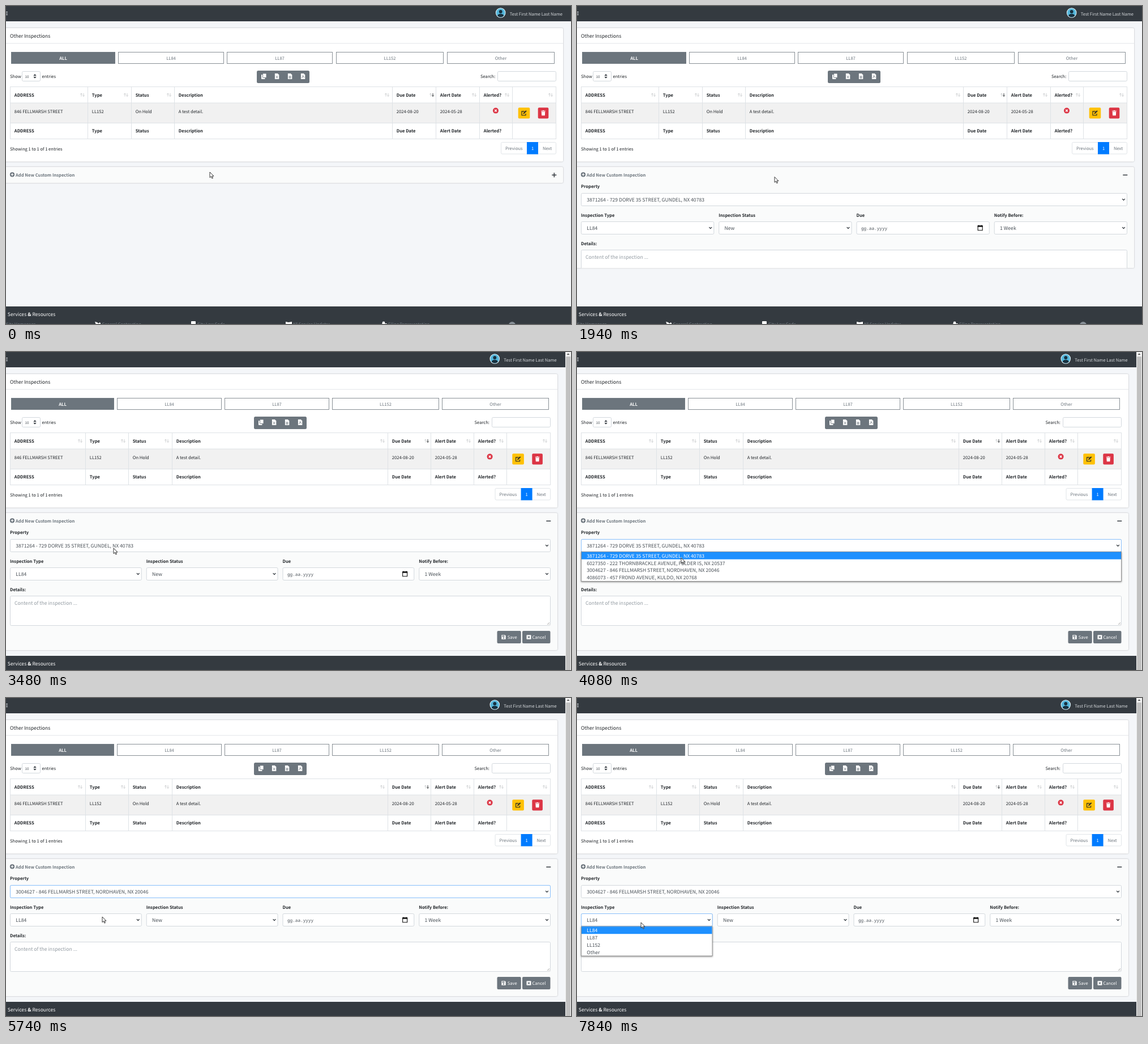
An HTML page for the animation above (8000 ms loop, 998x561 px).

```html
<!DOCTYPE html>
<html lang="en">
<head>
<meta charset="utf-8">
<title>Other Inspections</title>
<style>
html, body { margin: 0; width: 100%; height: 100%; overflow: hidden; background: #f4f6f9; }
svg { display: block; width: 100%; height: 100%; }
text { font-family: "Noto Sans CJK JP", "Noto Sans CJK SC", "Noto Sans", sans-serif; text-rendering: geometricPrecision; white-space: pre; }
.mono { font-family: "Noto Sans Mono", "DejaVu Sans Mono", monospace; }
.card { filter: drop-shadow(0 .6px 1px rgba(0,0,0,.28)); }
.popup { filter: drop-shadow(0 1px 1.5px rgba(0,0,0,.45)); }
</style>
</head>
<body>
<svg id="stage" viewBox="0 0 998 561" preserveAspectRatio="none"></svg>
<script>
const SMALL = 7.6, LARGE = 8.65;
const DARK = '#343a40', GRAY = '#6c757d', INK = '#212529', FIELD = '#495057', LINE = '#dee2e6';
const PROPERTIES = [
  '3871264 - 729 DORVE 35 STREET, GUNDEL, NX 40783',
  '6027350 - 222 THORNBRACKLE AVENUE, FELDER IS, NX 20537',
  '3004627 - 846 FELLMARSH STREET, NORDHAVEN, NX 20046',
  '4086073 - 457 FROND AVENUE, KULDO, NX 20768'
];
const TYPES = ['LL84', 'LL87', 'LL152', 'Other'];
const OPTION_H = 12.9;

const WIDE = {
  page: 998, shift: 0, right: 971, footer: 530,
  tabs: [[9, 193], [198, 385], [390, 577], [583, 773], [779, 969]],
  cols: [7, 144, 221, 297, 682, 759, 836, 894, 971], tools: 443
};
const NARROW = {
  page: 988, shift: -10.4, right: 961, footer: 536,
  tabs: [[9, 191], [196, 381], [386, 571], [576, 765], [770, 959]],
  cols: [7, 140, 216, 293, 674, 750, 826, 884, 961], tools: 438
};

const text = (x, y, s, o = {}) =>
  `<text x="${x}" y="${y}" font-size="${o.size || SMALL}" fill="${o.fill || INK}"` +
  ` font-weight="${o.bold ? 700 : 400}" text-anchor="${o.mid ? 'middle' : 'start'}" class="${o.cls || ''}">${s}</text>`;
const fill = (x, y, x2, y2, color, r = 0, cls = '') =>
  `<rect x="${x}" y="${y}" width="${x2 - x}" height="${y2 - y}" rx="${r}" fill="${color}" class="${cls}"/>`;
const box = (x, y, x2, y2, stroke = '#ced4da', bg = '#fff', r = 2, cls = '') =>
  `<rect x="${x + .5}" y="${y + .5}" width="${x2 - x}" height="${y2 - y}" rx="${r}" fill="${bg}" stroke="${stroke}" stroke-width=".9" class="${cls}"/>`;
const line = (d, color, w = 1) => `<path d="${d}" fill="none" stroke="${color}" stroke-width="${w}"/>`;
const shape = (d, color) => `<path d="${d}" fill="${color}"/>`;
const dot = (x, y, r, color) => `<circle cx="${x}" cy="${y}" r="${r}" fill="${color}"/>`;
const at = (x, y, s) => `<g transform="translate(${x} ${y})">${s}</g>`;

function header(L) {
  const x = 873.7 + L.shift;
  return fill(0, 0, L.page, 27, DARK) +
    line('M0 10.5H3M0 13H3M0 15.5H3', '#d0d4d8', 1.1) +
    at(x, 12, dot(0, 0, 8.8, '#e8f6fb') + dot(0, 0, 7.8, '#55b7dc') +
      shape('M-5.5 5.5Q-5 1.8 0 1.8T5.5 5.5Q3 7.8 0 7.8T-5.5 5.5Z', '#17303f') + dot(0, -2, 3, '#17303f')) +
    text(889.7 + L.shift, 16.6, 'Test First Name Last Name', { fill: '#d5d8db' });
}

function tools(x) {
  const sheet = mark => shape('M-3.6 -5H1.3L3.8 -2.5V5H-3.6Z', '#fff') + line(mark, GRAY, .9);
  return fill(x, 114, x + 93, 136, GRAY, 2.5) +
    at(x + 12.5, 124, fill(-4.5, -3, 2, 5, '#fff', .8) + box(-2.5, -5.5, 4, 2, GRAY, '#fff', .8)) +
    at(x + 35.5, 124, sheet('M-1.6 -.8L1.7 3.4M1.7 -.8L-1.6 3.4')) +
    at(x + 58.5, 124, sheet('M-2 0H2M-2 1.6H2M-2 3.2H2')) +
    at(x + 81.5, 124, sheet('M-2 3.2Q0 1 0 -1.5Q.5 1.5 2.4 2'));
}

function table(L) {
  const c = L.cols, names = ['ADDRESS', 'Type', 'Status', 'Description', 'Due Date', 'Alert Date', 'Alerted?', ''];
  const cells = ['846 FELLMARSH STREET', 'LL152', 'On Hold', 'A test detail.', '2024-08-20', '2024-05-28'];
  let s = fill(7, 142, L.right, 234, '#fff') + fill(7, 171, L.right, 206, '#f1f1f1');
  s += line(`M7 142.5H${L.right}M7 171H${L.right}M7 206.5H${L.right}M7 234.5H${L.right}`, LINE);
  s += line(c.map(x => `M${x + .5} 142V235`).join(''), LINE);
  names.forEach((n, i) => {
    const x = c[i] + 7.8, a = c[i + 1] - (i == 4 ? 7 : 9);
    s += text(x, 159.7, n, { bold: 1 }) + text(x, 222.7, n, { bold: 1 });
    if (cells[i]) s += text(x, 188.7, cells[i]);
    s += line(`M${a - 2} 159.5V154.3M${a - 3.7} 156L${a - 2} 154L${a - .3} 156`, '#c8cacc', .9) +
      line(`M${a + 2} 154V159.2M${a + .3} 157.5L${a + 2} 159.5L${a + 3.7} 157.5`, i == 4 ? INK : '#c8cacc', .9);
  });
  const d = L.shift;
  return s + at(865 + d, 184.6, dot(0, 0, 5, '#dc3545') + line('M-1.8 -1.8L1.8 1.8M1.8 -1.8L-1.8 1.8', '#fff', 1.4)) +
    at(915 + d, 188.7, fill(-10.3, -9.5, 10.3, 9.7, '#ffc107', 2) +
      line('M1 -2.8H-4V4H3V1', INK, 1.1) + line('M-1 1.2L4 -3.8', INK, 2)) +
    at(949 + d, 188.7, fill(-9.3, -9.5, 9.3, 9.7, '#dc3545', 2) +
      shape('M-3.8 -4H-1.3L-.8 -4.7H.8L1.3 -4H3.8V-2.9H-3.8ZM-3.3 -2.2H3.3L2.8 4.6H-2.8Z', '#fff'));
}

function listCard(L) {
  const d = L.shift, R = L.right;
  let s = fill(-8, 39, R + 13, 274.5, '#fff', 2, 'card') + line(`M0 66H${R + 13}`, '#e3e5e8') +
    text(7, 56, 'Other Inspections', { size: LARGE });
  ['ALL', ...TYPES].forEach((n, i) => {
    const [a, b] = L.tabs[i];
    s += box(a, 81, b - 1, 101, i ? '#7d858c' : GRAY, i ? '#fff' : GRAY, 0) +
      text((a + b) / 2, 94.5, n, { mid: 1, bold: !i, fill: i ? GRAY : '#fff' });
  });
  s += text(7, 126.6, 'Show') + box(28, 115, 60, 132) + text(33.5, 126.5, '10', { size: 6.2, fill: FIELD }) +
    shape('M48.3 123L51 120L53.7 123ZM48.3 124.8L51 127.8L53.7 124.8Z', DARK) + text(63.5, 126.6, 'entries') +
    tools(L.tools) + text(838 + d, 127, 'Search:') + box(868 + Math.round(d), 115, R, 132) + table(L) +
    text(7, 255.2, 'Showing 1 to 1 of 1 entries');
  s += box(874 + d, 240, R, 260.5, LINE) + fill(920 + d, 240, 940 + d, 261.5, '#007bff') +
    text(897.3 + d, 253.5, 'Previous', { mid: 1, fill: GRAY }) + text(930 + d, 253.5, '1', { mid: 1, fill: '#fff' }) +
    text(956 + d, 253.5, 'Next', { mid: 1, fill: GRAY });
  return s;
}

const chevron = (x, y) => line(`M${x - 2.4} ${y - 1.2}L${x} ${y + 1.2}L${x + 2.4} ${y - 1.2}`, DARK, 1.3);
function select(x, y, x2, value, cls = '') {
  return box(x, y, x2, y + 22) + (cls && box(x, y, x2, y + 22, '#80bdff', 'none', 2, cls + '-focus')) +
    text(x + 10.3, y + 15, value, { size: LARGE, fill: FIELD, cls }) + chevron(x2 - 5.5, y + 11.3);
}

function form(L) {
  const R = L.right, w = (R - 34) / 4, x = [0, 1, 2, 3].map(i => 7 + i * (w + 9)), y = 380;
  const label = (x, y, s) => text(x, y, s, { bold: 1 });
  let s = label(7, 321, 'Property') + select(7, 330, R, PROPERTIES[0], 'property');
  ['Inspection Type', 'Inspection Status', 'Due', 'Notify Before:'].forEach((n, i) => s += label(x[i], 371.6, n));
  s += select(x[0], y, x[0] + w, 'LL84', 'type') + select(x[1], y, x[1] + w, 'New') + select(x[3], y, x[3] + w, '1 Week') +
    box(x[2], y, x[2] + w, y + 22) + text(x[2] + 8.5, 395.3, 'gg.aa.yyyy', { size: 7.7, fill: FIELD, cls: 'mono' }) +
    at(x[2] + w - 15.6, 391.5, line('M-4 -3.5H4V4.2H-4Z', '#111', 1.1) + fill(-4.5, -4.4, 4.5, -1.8, '#111') +
      line('M-2.5 -5.2V-4M2.5 -5.2V-4', '#111', 1));
  s += label(7, 422.2, 'Details:') + box(7, 430, R, 482) +
    text(15, 445.8, 'Content of the inspection ...', { size: LARGE, fill: '#939ba2' }) +
    line(`M${R - 5} 481L${R - 1} 477M${R - 2.5} 481L${R - 1} 479.5`, '#888', .7);
  const d = R - 961;
  return s + fill(867.5 + d, 492, 909.7 + d, 514, GRAY, 2) + fill(912 + d, 492, 961.5 + d, 514, GRAY, 2) +
    at(879 + d, 503, shape('M-3.7 -3.7H2.4L3.7 -2.4V3.7H-3.7Z', '#fff') + fill(-2.5, -2.7, 1.5, -.8, GRAY) + dot(0, 1.4, 1.2, GRAY)) +
    text(885.8 + d, 506.4, 'Save', { fill: '#fff' }) +
    at(923.5 + d, 503, fill(-4, -3.7, 4, 3.7, '#fff', .7) + line('M-1.7 -1.7L1.7 1.7M1.7 -1.7L-1.7 1.7', GRAY, 1.2)) +
    text(929.5 + d, 506.4, 'Cancel', { fill: '#fff' });
}

function formCard(L) {
  const m = L.right - 2.7;
  return fill(-8, 284, L.right + 13, 526, '#fafbfb', 2, 'card form-card') +
    at(11, 297.4, dot(0, 0, 4.1, GRAY) + line('M-2.3 0H2.3M0 -2.3V2.3', '#fff', 1.3)) +
    text(17, 300.8, 'Add New Custom Inspection', { bold: 1, fill: GRAY }) +
    line(`M${m - 4} 298.2H${m + 4}`, DARK, 1.5) +
    `<g class="plus">${line(`M${m} 294.2V302.2`, DARK, 1.5)}</g>` +
    `<g class="form">${form(L)}</g>`;
}

function footer(L) {
  const y = L.footer, links = ['Site Homepage', 'General Contracting', 'City Law Code', 'All Service Updates', 'Filing Representation'];
  return fill(0, y, L.page, 561, DARK) +
    text(2.8, y + 17.2, 'Services <tspan font-weight="700">&amp;</tspan> Resources', { size: LARGE, fill: '#fff' }) +
    links.map((n, i) => text(i ? 1 + i * 168.5 : 0, y + 34, n, { size: 7.4, fill: '#7d858c' })).join('') +
    shape(`M157 ${y + 27}l4 1 2 2 3 -2 2 4h-9ZM494 ${y + 27}l5 1 6 -1v6h-11Z`, '#fff') +
    fill(327, y + 26, 335, y + 34, '#fff', 1) + dot(667, y + 29, 2.4, '#fff') + fill(664, y + 30, 673, y + 34, '#fff', 1) +
    dot(894, y + 33, 6, '#868e96');
}

const scrollbar = fill(988, 0, 998, 561, '#f1f1f1') + fill(989, 8, 997, 561, '#c1c1c1') + shape('M990.5 5L993 2.2L995.5 5Z', '#555');

function popup(id, x2, y, options) {
  return `<g id="${id}">` + box(7, y, x2, y + 52, '#8a8a8a', '#fff', 0, 'popup') +
    fill(8, y + .8, x2, y + .8 + OPTION_H, '#1e90ff', 0, 'mark') +
    options.map((o, i) => text(17.3, y + 10.6 + i * OPTION_H, o, { size: LARGE, fill: FIELD, cls: 'option' })).join('') + '</g>';
}

const page = (id, L) => `<g id="${id}">${header(L) + listCard(L) + formCard(L) + footer(L)}</g>`;
const stage = document.getElementById('stage');
stage.innerHTML = '<defs><clipPath id="reveal"><rect y="284" width="998" height="28"/></clipPath></defs>' +
  fill(0, 0, 998, 561, '#f4f6f9') + page('wide', WIDE) + page('narrow', NARROW) +
  `<g id="bar">${scrollbar}</g>` + popup('properties', 961, 352, PROPERTIES) + popup('types', 238.5, 402.5, TYPES) +
  '<path id="cursor" d="M0 0V9.7L2.3 7.6L3.9 11.2L5.5 10.5L3.9 7.1H7Z" fill="#fff" stroke="#222" stroke-width=".9" stroke-linejoin="round"/>';

const $ = q => stage.querySelector(q);
const show = (q, on) => $(q).setAttribute('display', on ? 'inline' : 'none');
const clamp = (v, a = 0, b = 1) => Math.min(b, Math.max(a, v));
$('#wide .form').setAttribute('clip-path', 'url(#reveal)');
show('#narrow .plus', false);

// time, x, y
const PATH = [
  [0, 360, 293], [20, 360, 293], [280, 354, 294], [560, 354, 294], [840, 342, 302], [1260, 342, 302],
  [1480, 349, 301.5], [2080, 349, 301.5], [2400, 220, 340], [2660, 200, 343], [2820, 200, 343],
  [3060, 190, 346], [3760, 190, 346], [4080, 184, 363], [4220, 181, 370], [4320, 181, 370],
  [4460, 177, 402], [4880, 177, 402], [5160, 171, 393], [5440, 170, 386], [6040, 170, 386],
  [6460, 137, 391], [6840, 124, 392], [6860, 124, 392], [7140, 113, 396], [8000, 113, 396]
];
function pointer(t) {
  const i = PATH.findIndex(p => p[0] > t), a = PATH[i - 1], b = PATH[i];
  const k = (t - a[0]) / (b[0] - a[0]);
  return [a[1] + (b[1] - a[1]) * k, a[2] + (b[2] - a[2]) * k];
}

function highlight(id, index, top) {
  $(`#${id} .mark`).setAttribute('y', top + index * OPTION_H);
  stage.querySelectorAll(`#${id} .option`).forEach((o, i) => o.setAttribute('fill', i == index ? '#fff' : FIELD));
}

function draw(t) {
  const narrow = t >= 2080, [x, y] = pointer(t);
  show('#wide', !narrow);
  show('#narrow', narrow);
  show('#bar', narrow);

  const p = clamp((Math.min(t, 1980) - 1688) / 400);
  const height = 28 + 214 * (.5 - Math.cos(Math.PI * p) / 2);
  $('#wide .form-card').setAttribute('height', height);
  $('#reveal rect').setAttribute('height', height);
  show('#wide .plus', p == 0);

  const blur = clamp((t - 7310) / 150);
  $('#narrow .property').textContent = PROPERTIES[t < 5600 ? 0 : 2];
  $('#narrow .property-focus').setAttribute('opacity', clamp((t - 3490) / 150) - blur);
  $('#narrow .type-focus').setAttribute('opacity', blur);
  $('#wide .property-focus').setAttribute('opacity', 0);
  $('#wide .type-focus').setAttribute('opacity', 0);

  show('#properties', t >= 3520 && t < 5600);
  show('#types', t >= 7340);
  highlight('properties', clamp(Math.floor((y - 353) / OPTION_H), 0, 3), 352.8);
  highlight('types', 0, 403.3);
  $('#cursor').setAttribute('transform', `translate(${x} ${y})`);
}

const start = performance.now();
function tick() {
  draw((performance.now() - start) % 8000);
  requestAnimationFrame(tick);
}
tick();
</script>
</body>
</html>
```
